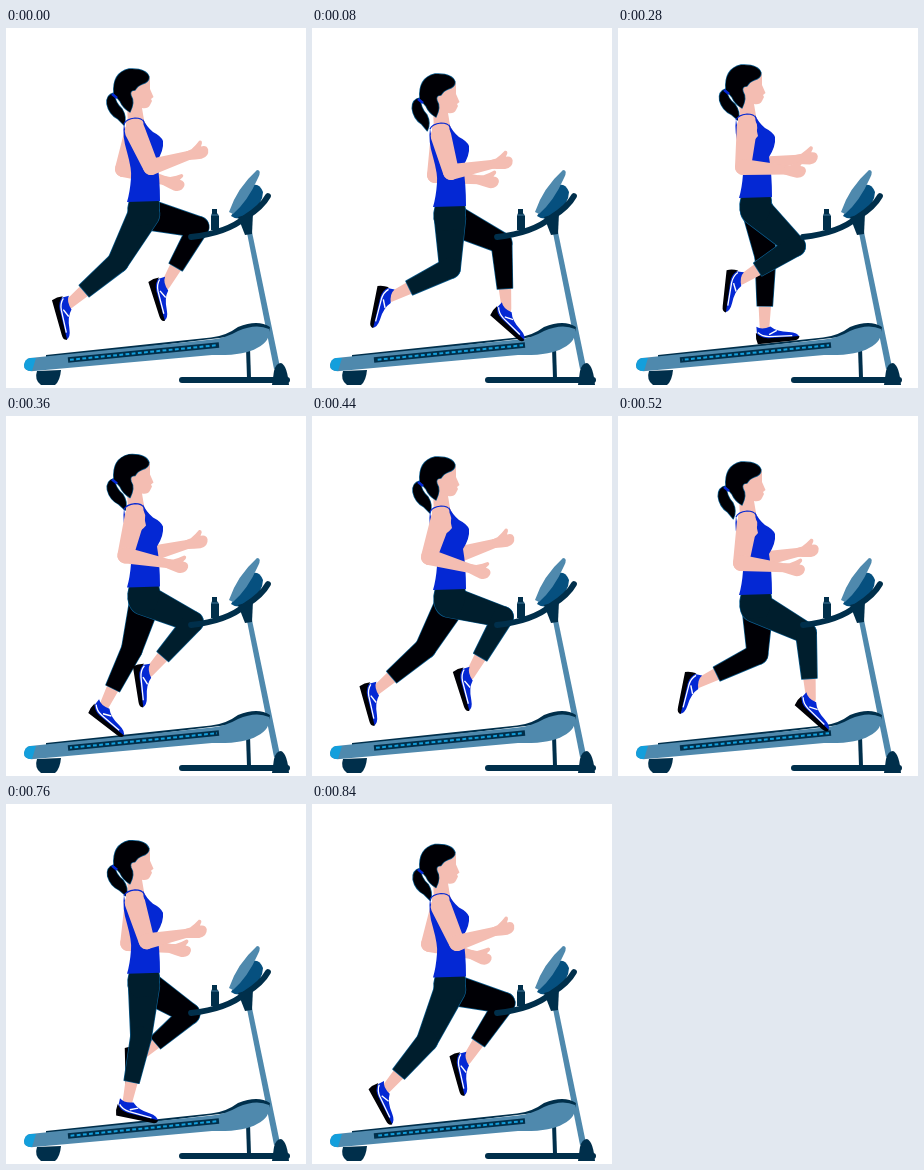
Write an HTML page with a canvas that moves like this. It is 300x360 px and loops after 0.88 s.

```html
<!DOCTYPE html>
<html lang="en">
<head>
<meta charset="utf-8">
<title>Treadmill run</title>
<style>
html, body { margin: 0; width: 100%; height: 100%; overflow: hidden; background: #fff; }
canvas { display: block; width: 300px; height: 360px; }
</style>
</head>
<body>
<canvas id="stage"></canvas>
<script>
const W = 300, H = 360, LOOP = 880, STEP = 40, HALF = LOOP / 2;
const SKIN = '#f4bdb2', BLUE = '#0428d4', NAVY = '#001e2d', BLACK = '#000005',
      STEEL = '#4f89ad', DEEP = '#002f4b', MID = '#06507f', SKY = '#139fdc', EDGE = '#0b5c8e';

const canvas = document.getElementById('stage');
const scale = window.devicePixelRatio || 1;
canvas.width = W * scale;
canvas.height = H * scale;
const g = canvas.getContext('2d');

// time, knee x y, ankle x y, foot degrees, elbow x y, wrist x y
const STRIDE = [
  [0,   112, 234,  63, 276,  75, 145, 139, 184, 127],
  [80,  138, 240,  79, 269, 102, 139, 144, 182, 136],
  [200, 168, 232, 108, 249, 111, 130, 141, 176, 140],
  [280, 177, 218, 123, 252,  97, 125, 139, 169, 142],
  [400, 191, 201, 153, 258,  75, 117, 140, 161, 151],
  [440, 191, 201, 158, 259,  73, 117, 141, 160, 153],
  [520, 188, 217, 193, 283,  42, 123, 147, 168, 152],
  [640, 169, 232, 184, 296,   8, 131, 141, 178, 140],
  [720, 146, 231, 145, 302,  -5, 138, 137, 181, 131],
  [840, 115, 237,  74, 285,  62, 145, 139, 184, 127]
];
// time, vertical shift of the body
const BOB = [[0, 0], [80, 5], [200, 0], [280, -4], [320, -4.2], [400, -0.5]];

// Smooth periodic curve through the rows of a table
function sample(rows, period, time) {
  const t = time % period, n = rows.length;
  let i = n - 1;
  while (rows[i][0] > t) i--;
  const row = k => rows[(k + n) % n];
  const when = k => row(k)[0] + period * Math.floor(k / n);
  const t0 = when(i), t1 = when(i + 1), d = t1 - t0, u = (t - t0) / d;
  return row(i).slice(1).map((p, c) => {
    const q = row(i + 1)[c + 1];
    const m0 = (q - row(i - 1)[c + 1]) / (t1 - when(i - 1)) * d;
    const m1 = (row(i + 2)[c + 1] - p) / (when(i + 2) - t0) * d;
    return p + u * (m0 + u * (3 * (q - p) - 2 * m0 - m1 + u * (2 * (p - q) + m0 + m1)));
  });
}

function fill(shape, color) {
  g.fillStyle = color;
  g.fill(typeof shape === 'string' ? new Path2D(shape) : shape);
}

function line(shape, color, width, cap = 'butt') {
  g.strokeStyle = color;
  g.lineWidth = width;
  g.lineCap = cap;
  g.lineJoin = 'round';
  g.stroke(typeof shape === 'string' ? new Path2D(shape) : shape);
}

function outlined(shapes, color, edge = EDGE) {
  shapes.forEach(s => line(s, edge, 1.4));
  shapes.forEach(s => fill(s, color));
}

// Tapered limb, round at the start, round or flat at the end
function limb(x1, y1, r1, x2, y2, r2, flat) {
  const a = Math.atan2(y2 - y1, x2 - x1), q = Math.PI / 2, p = new Path2D();
  p.arc(x1, y1, r1, a + q, a + 3 * q);
  if (flat) {
    p.lineTo(x2 + r2 * Math.sin(a), y2 - r2 * Math.cos(a));
    p.lineTo(x2 - r2 * Math.sin(a), y2 + r2 * Math.cos(a));
  } else {
    p.arc(x2, y2, r2, a - q, a + q);
  }
  p.closePath();
  return p;
}

function shoe(x, y, deg) {
  g.save();
  g.translate(x, y);
  g.rotate(deg * Math.PI / 180);
  fill('M-8-2 Q-3 2 6-1 Q12 5 24 6 Q33 7 34 12 L-8 13Z', BLUE);
  fill('M-9 4 Q-5 10 3 10.5 L34 11 Q34 15 28 15 L-8 15.5Q-10 10-9 4Z', BLACK);
  line('M-7 4 Q-3 8.5 4 9 L27 10', '#fff', 1.3);
  line('M4 7 L12 3.5', '#fff', 1.4);
  g.restore();
}

function leg(pose, bob, color, dx, dy, pelvis) {
  const [kx, ky, ax, ay, deg] = pose;
  const hx = ax + (kx - ax) * 0.31, hy = ay + (ky - ay) * 0.31;
  g.save();
  g.translate(dx, dy);
  fill(limb(hx, hy, 6.2, ax, ay, 4.8), SKIN);
  shoe(ax, ay, deg);
  const parts = [limb(138, 186 + bob - dy, 15.5, kx, ky, 10.3), limb(kx, ky, 10.3, hx, hy, 7.6, true)];
  if (pelvis) {
    const hips = new Path2D();
    hips.addPath(new Path2D('M124 170 L152 169 Q156 184 148 196 L130 198 Q121 192 122 180Z'), new DOMMatrix([1, 0, 0, 1, 0, bob]));
    parts.push(hips);
  }
  outlined(parts, color);
  g.restore();
}

function arm(pose, bob) {
  const [ex, ey, wx, wy] = pose.slice(5);
  fill(limb(129, 103 + bob, 10.3, ex, ey, 8), SKIN);
  fill(limb(ex, ey, 8, wx, wy, 4.4), SKIN);
  g.save();
  g.translate(wx, wy);
  g.rotate(Math.atan2(wy - ey, wx - ex));
  fill('M-3-4.4 L3-5 Q9-8 13-11 Q16-11 15-8 L13-5 Q19-5 19 0 Q18 7 10 7 Q4 6-3 4.4Z', SKIN);
  g.restore();
}

function head(bob) {
  fill('M121 76 L122 98 L139 98 L136 80 Q142 81 144 77 L146 73 L145 71 L147.5 69 L144 61 L144 50 L124 52Z', SKIN);
  g.save();
  g.translate(108, 67);
  g.rotate(bob * 0.018);
  outlined([new Path2D('M0-2 Q-8 0-7 9 Q-5 19 4 24 L10 30 Q13 22 8 14 Q1 8 0-2Z')], BLACK);
  g.restore();
  outlined([new Path2D('M108 66 Q106 45 123 41 Q140 40 143 49 Q143 54 136 56 Q131 58 129 62 Q123 62 125 68 Q129 74 124 84 Q117 80 114 73Z')], BLACK);
  line('M106 66 L111 70', BLUE, 2.6);
}

function shirt() {
  fill('M120 93 Q128 88 137 91 L143 102 L139 120 L120 118Z', SKIN);
  fill('M118 95 Q116 108 121 124 Q126 142 125 150 Q124 164 121 174 L154 173 Q154 150 151 133 Q158 122 157 113 Q155 108 147 104 Q140 98 137 91 Q138 104 140 112 Q132 122 125 116 Q119 106 118 95Z', BLUE);
  line('M118 96 Q120 91 129 90 Q136 90 138 94', BLUE, 1.2);
}

function frame(time) {
  const shift = (time / 110 * 6.2) % 6.2;
  fill('M31 343 L55 342 Q54 353 49 357 L35 357 Q28 352 31 343Z', DEEP);
  line('M176 352 L281 352', DEEP, 6, 'round');
  line('M242 320 L243 350', DEEP, 4);
  fill('M241 205 L246 204 L274 339 L268 341Z', STEEL);
  fill('M266 357 L268 343 Q270 335 275 335 Q281 337 283 357Z', DEEP);
  fill('M40 327 L205 309.5 Q220 308 232 299 Q252 291 264 299 L263 304 L40 331Z', DEEP);
  fill('M24 330 L206 311.5 Q220 310 232 303 Q250 295 263 301 Q265 313 251 320 Q238 328 206 327 L28 343 Q18 344 18 337 Q19 331 24 330Z', STEEL);
  fill('M24 330 L30 330 L26 343 Q18 343 18 337 Q19 331 24 330Z', SKY);
  line('M62 332 L213 317', DEEP, 5.4);
  g.setLineDash([3.8, 2.4]);
  g.lineDashOffset = shift;
  line('M64 331.8 L211 317.2', SKY, 2);
  g.setLineDash([]);
}

function controls() {
  fill('M225 188 L243 160 Q252 152 257 164 Q257 176 242 188 Q232 193 225 188Z', MID);
  fill('M223 184 Q231 160 251 142 Q256 142 252 150 Q242 173 227 186Z', STEEL);
  fill('M232 189 L247 185 L246 206 L239 207Z', DEEP);
  line('M185 209 Q221 205 240 189 Q256 179 262 168', DEEP, 5.8, 'round');
  fill('M206 181 H211 V185 L213 188 V202 H205 V188 L206 185Z', DEEP);
  line('M205.5 187 H212.5', STEEL, 0.8);
}

function draw(time) {
  const near = sample(STRIDE, LOOP, time);
  const far = sample(STRIDE, LOOP, time + HALF);
  const bob = sample(BOB, HALF, time)[0];
  g.setTransform(scale, 0, 0, scale, 0, 0);
  g.fillStyle = '#fff';
  g.fillRect(0, 0, W, H);
  frame(time);
  arm(far, bob);
  leg(far, bob, BLACK, 1.5, -2, false);
  leg(near, bob, NAVY, 0, 0, true);
  g.save();
  g.translate(0, bob);
  head(bob);
  shirt();
  g.restore();
  arm(near, bob);
  controls();
}

const start = performance.now();
function tick() {
  const t = performance.now() - start;
  draw(Math.floor(t / STEP) * STEP % LOOP);
  requestAnimationFrame(tick);
}
tick();
</script>
</body>
</html>
```
